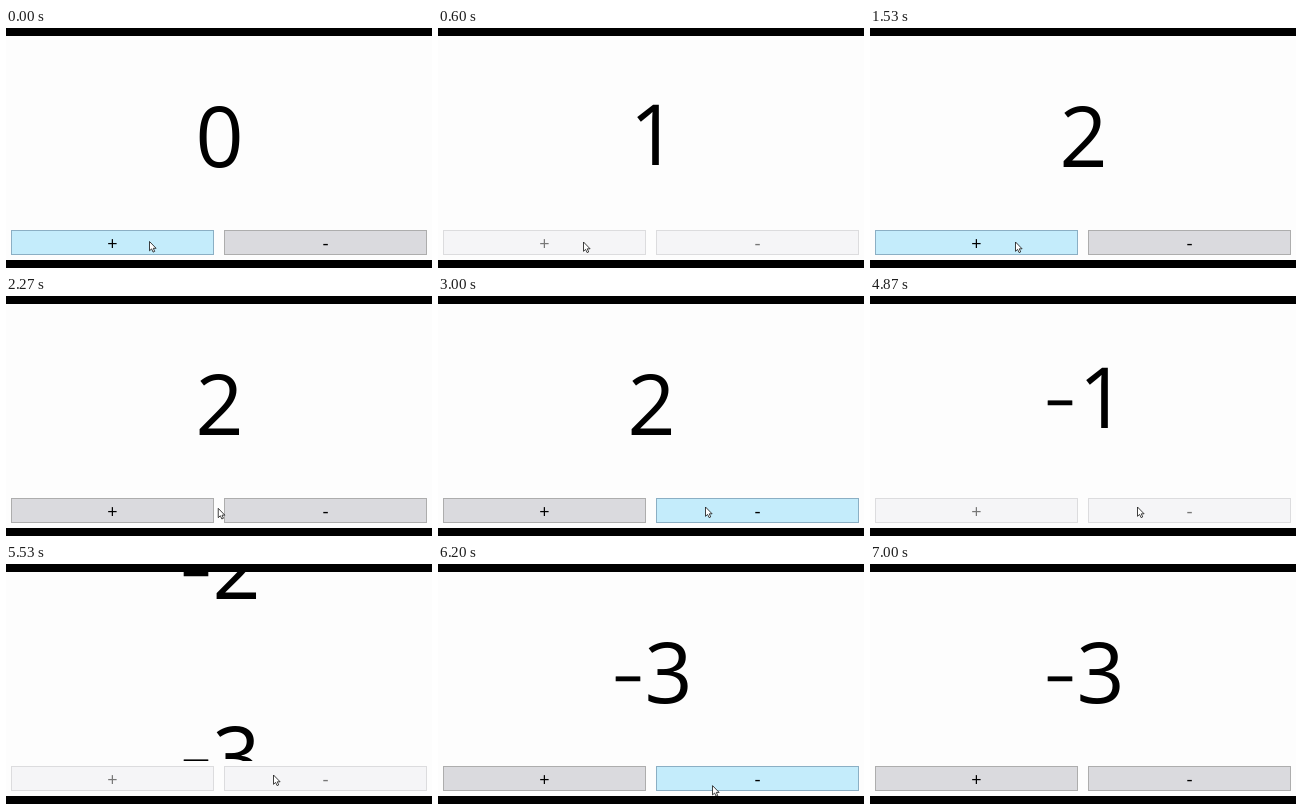
These frames come from a looping animation (426 px wide and 240 px high, 7070 ms). An HTML page:

```html
<!DOCTYPE html>
<html lang="en">
<head>
<meta charset="utf-8">
<title>Counter</title>
<style>
  html, body { margin: 0; width: 100%; height: 100%; overflow: hidden; background: #000; }
  svg { display: block; width: 100%; height: 100%; }
  text { font-family: "Open Sans", "Noto Sans", sans-serif; text-anchor: middle; }
  .digit { font-size: 84px; }
  .minus { font-size: 57px; stroke: #000; stroke-width: .7; }
  .button rect { fill: #dadade; stroke: #adadad; }
  .button.hover rect { fill: #c4ecfb; stroke: #8bafc4; }
  .button.disabled rect { fill: #f5f5f7; stroke: #dcdcde; }
  .button.disabled text { fill: #777; }
</style>
</head>
<body>
<svg viewBox="0 0 426 240">
  <clipPath id="view"><rect y="8" width="426" height="189"/></clipPath>
  <rect y="8" width="426" height="224" fill="#fdfdfd"/>
  <g clip-path="url(#view)"><g id="strip"></g></g>
  <g class="button">
    <rect x="5.5" y="202.5" width="202" height="24"/>
    <text x="106.5" y="222.2" font-size="18">+</text>
  </g>
  <g class="button">
    <rect x="218.5" y="202.5" width="202" height="24"/>
    <text x="319.5" y="221.6" font-size="19">-</text>
  </g>
  <path id="cursor" d="M0 0V9.3L2.1 7.4 3.6 10.6 5.2 9.9 3.8 6.8H6.6Z" fill="#fff" stroke="#111" stroke-width=".8"/>
  <rect y="232" width="426" height="8"/>
</svg>
<script>
const LOOP = 7070, SLIDE = 400, PITCH = 188;
// click time and step
const clicks = [[225, 1], [930, 1], [3080, -1], [3640, -1], [4330, -1], [4820, -1], [5317, -1]];
// time, x, y of the pointer tip
const route = [
  [0, 143.5, 213.5], [150, 145.5, 214], [1900, 145.5, 214],
  [2600, 267.5, 211], [6050, 267.5, 211], [6450, 290, 245]
];
const strip = document.getElementById('strip');
const cursor = document.getElementById('cursor');
const buttons = [...document.querySelectorAll('.button')];

const clamp = v => Math.max(0, Math.min(1, v));
const ease = p => (1 - Math.cos(Math.PI * clamp(p))) / 2;

function addText(cls, x, y, content) {
  const el = document.createElementNS('http://www.w3.org/2000/svg', 'text');
  el.setAttribute('class', cls);
  el.setAttribute('x', x);
  el.setAttribute('y', y);
  el.textContent = content;
  strip.append(el);
}

// Higher numbers sit above lower ones on one long strip.
for (let n = 2; n >= -3; n--) {
  const top = -n * PITCH;
  const x = (n < 0 ? 230.5 : 213.5) + (Math.abs(n) === 1 ? 2 : 0);
  addText('digit', x, 139 + top, Math.abs(n));
  if (n < 0) addText('minus', 190, 129.5 + top, '–');
}

function pointer(t) {
  const i = route.findIndex(p => p[0] > t);
  if (i < 0) return route[route.length - 1].slice(1);
  const [t0, x0, y0] = route[i - 1], [t1, x1, y1] = route[i];
  const k = ease((t - t0) / (t1 - t0));
  return [x0 + (x1 - x0) * k, y0 + (y1 - y0) * k];
}

function draw(now) {
  const t = now % LOOP;
  const value = clicks.reduce((sum, [at, step]) => sum + step * ease((t - at) / SLIDE), 0);
  const busy = clicks.some(([at]) => t >= at && t < at + SLIDE);
  const [x, y] = pointer(t);
  strip.setAttribute('transform', `translate(0 ${value * PITCH})`);
  cursor.setAttribute('transform', `translate(${x} ${y})`);
  buttons.forEach((button, i) => {
    const left = i ? 218 : 5;
    const over = x >= left && x <= left + 203 && y >= 202 && y <= 227;
    button.classList.toggle('disabled', busy);
    button.classList.toggle('hover', over && !busy);
  });
}

const start = performance.now();
function tick() {
  draw(performance.now() - start);
  requestAnimationFrame(tick);
}
tick();
</script>
</body>
</html>
```
